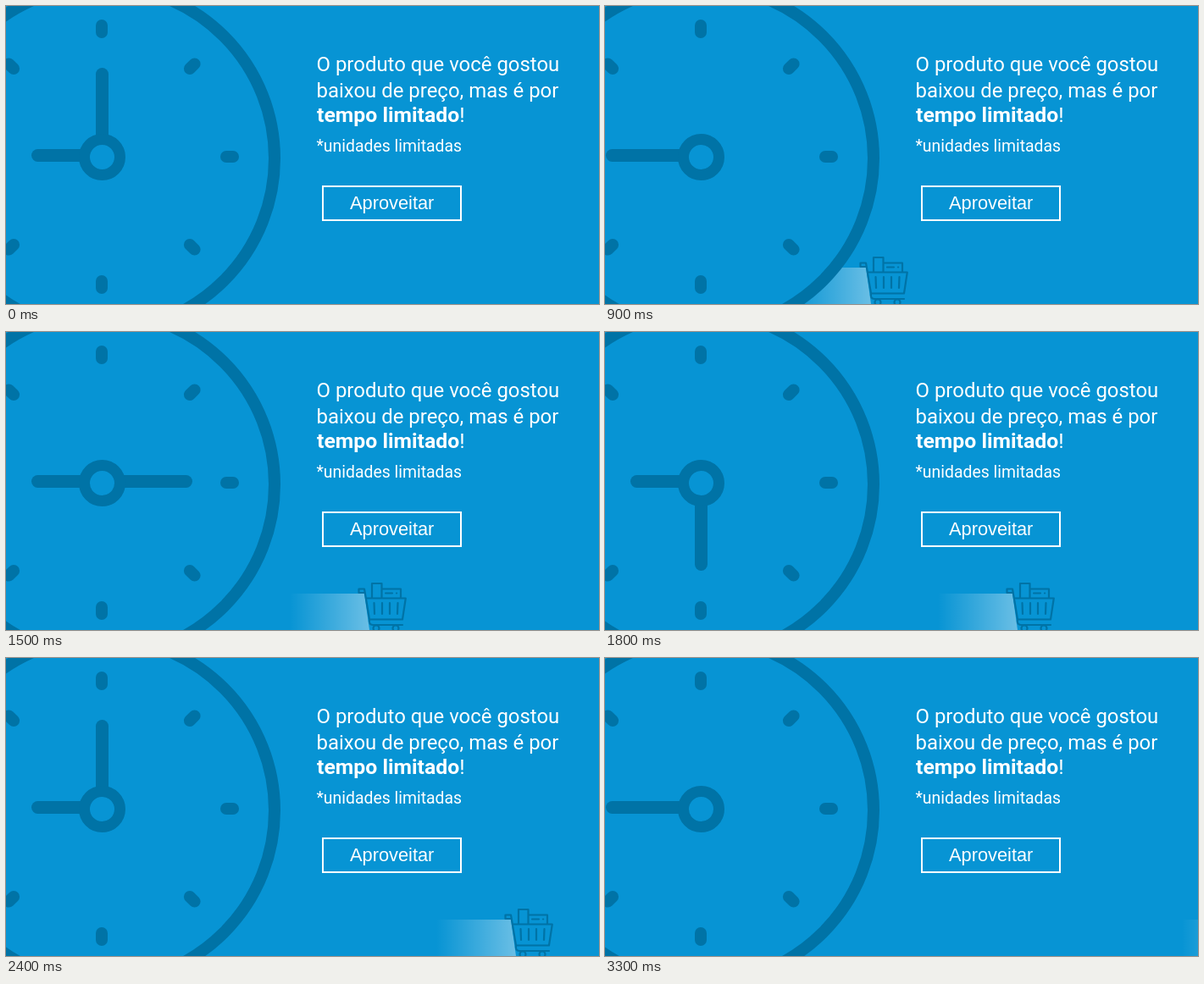
These frames come from a looping animation (700x352 px, 3600 ms). An HTML page:

```html
<!DOCTYPE html>
<html lang="pt-BR">
<head>
<meta charset="utf-8">
<title>Tempo limitado</title>
<style>
  html, body { margin: 0; width: 100%; height: 100%; overflow: hidden; background: #0794d4; }
  svg { display: block; width: 700px; height: 352px; }
  .line { fill: none; stroke: #0073a6; stroke-linecap: round; stroke-linejoin: round; }
  .face { fill: #0794d4; stroke: #0073a6; }
  text { fill: #fff; font-family: Roboto, sans-serif; font-size: 23.95px; }
  .strong { font-weight: 700; font-size: 24.8px; }
  .regular { font-weight: 400; }
  .note { font-size: 19.4px; }
  .button { font-family: "Liberation Sans", Arial, sans-serif; font-size: 21.8px; }
</style>
</head>
<body>
<svg viewBox="0 0 700 352">
  <defs>
    <linearGradient id="fade" gradientUnits="userSpaceOnUse" x1="-80" x2="14" y1="0" y2="0">
      <stop offset="0" stop-color="#fff" stop-opacity="0"/>
      <stop offset="1" stop-color="#fff" stop-opacity=".4"/>
    </linearGradient>
  </defs>

  <g id="cart">
    <path fill="url(#fade)" d="M-80 309H8L14 352H-80Z"/>
    <g class="line" stroke-width="2.2">
      <path d="M8 308H1.5V303.500H8L14 339.500H53L56.800 314.500H10"/>
      <path d="M14 339.500Q13 346 18 346H53"/>
      <path d="M17 314V297H28.500V314M28.500 303.500H51V314M33 308.500H41M46 308.500H46.200"/>
      <path d="M19.500 320L20 333M29 320V333M38 320V333M47.500 320L47 333"/>
      <circle cx="22" cy="350" r="3.500"/>
      <circle cx="45" cy="350" r="3.500"/>
    </g>
  </g>

  <circle class="face" cx="113" cy="180" r="204" stroke-width="14"/>
  <g id="ticks" class="line" stroke-width="14"></g>
  <g class="line" stroke-width="15">
    <path d="M113.500 176.500H37.500"/>
    <path id="minute"/>
  </g>
  <circle class="face" cx="113.500" cy="178.500" r="21" stroke-width="13"/>

  <text x="366.500" y="77">O produto que você gostou</text>
  <text x="366.500" y="107.500">baixou de preço, mas é por</text>
  <text x="367" y="137" class="strong">tempo limitado<tspan class="regular">!</tspan></text>
  <text x="366.500" y="172" class="note">*unidades limitadas</text>
  <rect x="374" y="213" width="163" height="40" fill="none" stroke="#fff" stroke-width="2"/>
  <text x="406" y="240" class="button">Aproveitar</text>
</svg>
<script>
  const STEP = 300, STEPS = 12;
  const byId = id => document.getElementById(id);
  const cart = byId('cart'), minute = byId('minute');
  const handEnds = ['V80.500', 'H212.500', 'V274.500', 'H8.500'];

  byId('ticks').innerHTML = Array.from({ length: 8 }, (_, i) =>
    `<path d="M0 -155V-147" transform="translate(113 178) rotate(${i * 45})"/>`).join('');

  function draw(now) {
    const step = Math.floor(now / STEP) % STEPS;
    const quarter = step % 4;
    const startY = quarter % 2 ? 176.5 : 178.5;
    minute.setAttribute('d', `M113.500 ${startY}${handEnds[quarter]}`);
    cart.setAttribute('transform', `translate(${Math.floor(127.6 + 57.6 * step)} 0)`);
  }

  const start = performance.now();
  function tick() {
    draw(performance.now() - start);
    requestAnimationFrame(tick);
  }
  tick();
</script>
</body>
</html>
```
